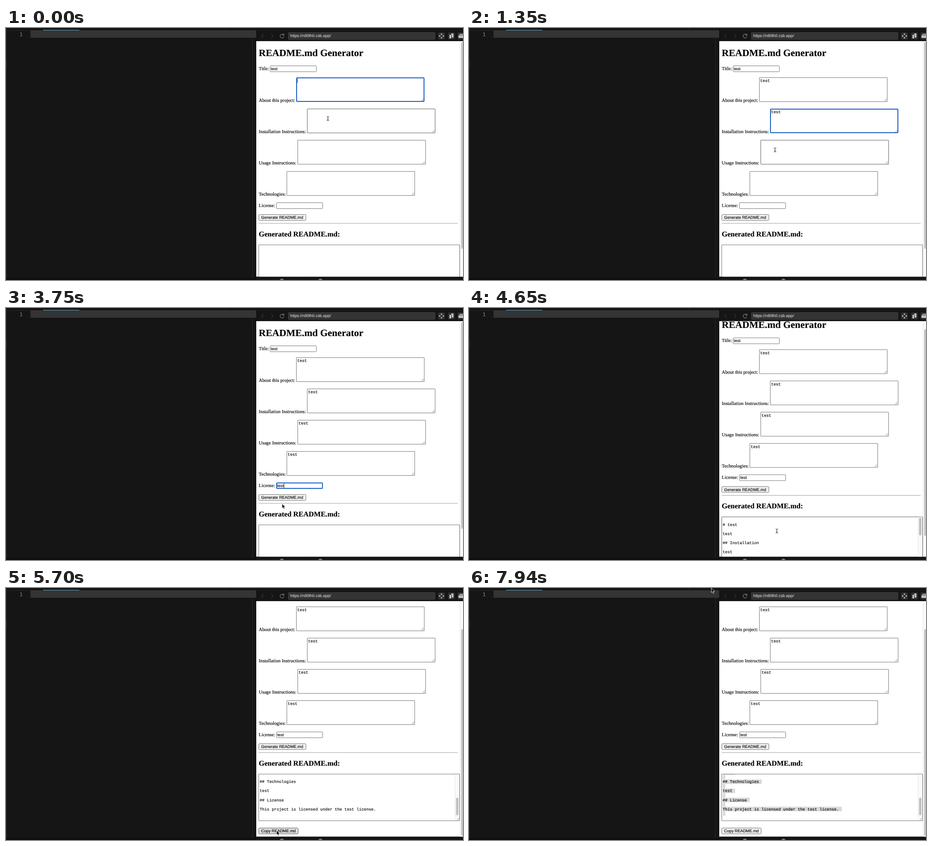
Write an HTML page that moves like this. It is 1008 by 556 pixels and loops after 8 s.

```html
<!DOCTYPE html>
<html lang="en">
<head>
<meta charset="utf-8">
<title>README.md Generator</title>
<style>
html, body { margin: 0; width: 100%; height: 100%; overflow: hidden; background: #151515; }
svg { display: block; width: 1008px; height: 556px; }
text { white-space: pre; text-rendering: geometricPrecision; }
#page text { stroke: #000; stroke-width: .15px; }
.serif { font: 10.7px "Liberation Serif", serif; }
.h1 { font: bold 21.4px "Liberation Serif", serif; }
.h2 { font: bold 16.05px "Liberation Serif", serif; }
.sans { font: 8.92px "Liberation Sans", sans-serif; }
.mono { font: 8.92px "Liberation Mono", monospace; }
.number { font: 11px "DejaVu Sans Mono", monospace; }
.line { fill: none; stroke-width: 1; }
</style>
</head>
<body>
<svg viewBox="0 0 1008 556">
  <defs>
    <clipPath id="view"><rect x="552" y="29" width="456" height="519.5"/></clipPath>
    <clipPath id="outBox"><rect x="558" y="479" width="432" height="102"/></clipPath>
    <path id="beam" d="M-2.500-4.500Q0-4.500 0-3Q0-4.500 2.500-4.500M0-3V3M-2.500 4.500Q0 4.500 0 3Q0 4.500 2.500 4.500M-1.200 1.500H1.200" class="line" stroke="#222"/>
    <path id="arrow" d="M0 0V10L2.300 7.900L4 11.800L5.700 11.100L4.100 7.300H7.200Z" stroke="#fff" stroke-width=".8"/>
    <path id="gem" d="M0-2l2 2-2 2-2-2z"/>
  </defs>

  <!-- editor -->
  <path d="M0 5.500H552M484.500 0V5M.500 0V556M543.500 21V552" class="line" stroke="#272727"/>
  <rect x="54" y="5" width="498" height="16.500" fill="#343434"/>
  <rect x="82" y="4" width="80" height="1.300" fill="#4f8fb5"/>
  <rect y="72" width="1" height="19" fill="#454545"/>
  <rect y="552" width="552" height="4" fill="#0d0d0d"/>
  <text x="30" y="17.500" class="number" fill="#8c8c8c">1</text>

  <!-- browser bar -->
  <path d="M552.500 0V29" class="line" stroke="#0c0c0c"/>
  <path d="M553 5.500H1008" class="line" stroke="#1d1d1d"/>
  <rect x="622" y="9" width="325" height="17" rx="2" fill="#343434"/>
  <text x="627" y="20.300" class="sans" fill="#f0f0f0">https://n80lh0.csb.app/</text>
  <path d="M568 13l-4.500 4.500 4.500 4.500M585 13l4.500 4.500-4.500 4.500" class="line" stroke="#484848"/>
  <path d="M612.500 15.500a4.300 4.300 0 1 0 .500 3.500M613 12.500v3.500h-3.500" class="line" stroke="#a8a8a8"/>
  <g fill="#303030">
    <rect x="953" y="10" width="15" height="15" rx="2"/>
    <rect x="975" y="10" width="15" height="15" rx="2"/>
    <rect x="996" y="10" width="15" height="15" rx="2"/>
  </g>
  <g fill="#bdbdbd">
    <use href="#gem" x="960.500" y="13.500"/><use href="#gem" x="960.500" y="21.500"/>
    <use href="#gem" x="956.500" y="17.500"/><use href="#gem" x="964.500" y="17.500"/>
    <path d="M978 15h4v8h-4zM982 12h5v9h-4v-6h-1zM1000 13h8v2h-8zM998 16h10v6h-10z"/>
  </g>

  <g clip-path="url(#view)">
    <rect x="552" y="29" width="456" height="520" fill="#fff"/>
    <g id="page"></g>
    <rect x="1002" y="29" width="6" height="520" fill="#fafafa"/>
    <path d="M1001.500 29V549" class="line" stroke="#e6e6e6"/>
    <rect id="thumb" x="1004" width="5" height="456" rx="2" fill="#c1c1c1"/>
  </g>

  <!-- lower tabs -->
  <g class="sans" fill="#777">
    <text x="566" y="561.500">Console</text><circle cx="608.500" cy="558" r="5"/>
    <text x="625" y="561.500">Problems</text><circle cx="693.500" cy="558" r="5"/>
  </g>
  <use id="mouse"/>
</svg>
<script>
const $ = id => document.getElementById(id);
const LOOP = 8000, STEP = 150;
const LEFT = 557, CHAR = 5.352, ROW = 10.03, TEXT_Y = 10.4;
const SUBMIT = 4050, COPY = 6150, SELECT = 7500;
const PAGE_END = 68, OUT_END = 12 * ROW;

const pen = document.createElement('canvas').getContext('2d');
pen.font = '10.7px "Liberation Serif", serif';

// Each box follows its label; areas are stacked at an even pitch between two inputs.
const focusAt = [-LOOP, 0, 450, 1500, 2100, 3150, SUBMIT];
const fields = ['Title', 'About this project', 'Installation Instructions',
  'Usage Instructions', 'Technologies', 'License'].map((name, i) => {
  const label = name + ':', input = i % 5 === 0;
  const x = Math.floor(LEFT + 3.2 + pen.measureText(label).width);
  return input
    ? { label, input, x, y: i ? 385 : 83, w: 103, h: 14, base: 10, from: focusAt[i], to: focusAt[i + 1] }
    : { label, x, y: 40 + 69 * i, w: 283, h: 54, base: 54, from: focusAt[i], to: focusAt[i + 1] };
});
const output = { x: LEFT, y: 478, w: 444, h: 104 };
const generate = { x: LEFT, y: 411, w: 105, h: 14, label: 'Generate README.md', press: SUBMIT };
const copy = { x: LEFT, y: 597, w: 88, h: 14, label: 'Copy README.md', press: COPY };
const lines = ['# test', 'test', '## Installation', 'test', '## Usage', 'test', '## Technologies',
  'test', '## License', 'This project is licensed under the test license.'].flatMap(s => ['', s]).concat('');

// pointer moves: start, end, x, y
const moves = [
  [750, 1050, 680, 328], [1050, 1350, 675, 269], [1800, 2100, 668, 336],
  [2400, 2850, 641, 391], [3450, 3750, 609, 432], [3750, 3900, 608, 420],
  [4200, 4500, 679, 492], [5250, 5700, 597, 535], [6450, 7200, 534.5, 0]
];

function ease(t, from, to) {
  const p = Math.min(1, Math.max(0, (t - from) / (to - from)));
  return p * p * (3 - 2 * p);
}

function pointerAt(t) {
  let x = 710, y = 200;
  for (const [from, to, x1, y1] of moves) {
    const p = ease(t, from, to);
    x += (x1 - x) * p;
    y += (y1 - y) * p;
  }
  return [x, y];
}

const inside = (b, x, y) => x >= b.x && x < b.x + b.w && y >= b.y && y < b.y + b.h;
const text = (x, y, cls, s) => `<text x="${x}" y="${y}" class="${cls}">${s}</text>`;
const rect = (x, y, w, h, fill, more = '') =>
  `<rect x="${x}" y="${y}" width="${w}" height="${h}" fill="${fill}" ${more}/>`;
const line = (d, color) => `<path d="${d}" class="line" stroke="${color}"/>`;
const frame = (b, fill, hover, r) =>
  rect(b.x + .5, b.y + .5, b.w - 1, b.h - 1, fill, `stroke="${hover ? '#5f5f5f' : '#767676'}" rx="${r}"`);

function box(b, hover, focus) {
  const grip = b.input ? '' : line(`M${b.x + b.w - 7} ${b.y + b.h - 2}l5-5m-2 5l2-2`, '#888');
  return (focus
    ? rect(b.x + 1, b.y + 1, b.w - 2, b.h - 2, '#fff', 'stroke="#1a5ec4" stroke-width="2" rx="1"')
    : frame(b, '#fff', hover, b.input ? 1 : .5)) + grip;
}

function field(f, t, hover) {
  const focus = t >= f.from && t < f.to, age = t - f.from;
  const typed = 'test'.slice(0, Math.max(0, age / STEP * 2));
  const x = f.x + 2.3, end = x + typed.length * (f.input ? 3.6 : CHAR);
  const caret = focus && age % 1200 <= 600 ? rect(end + .2, f.y + 2.5, .8, 9.5, '#000') : '';
  return text(LEFT + .5, f.y + f.base, 'serif', f.label) + box(f, hover, focus)
    + text(x, f.y + TEXT_Y - (f.input ? .4 : 0), f.input ? 'sans' : 'mono', typed) + caret;
}

function button(b, t, hover) {
  const down = t >= b.press && t < b.press + STEP;
  return frame(b, down ? '#f5f5f5' : hover ? '#dedede' : '#efefef', hover, 2)
    + text(b.x + 5.8, b.y + TEXT_Y, 'sans', b.label);
}

function result(t, hover) {
  if (t <= SUBMIT) return box(output, hover);
  const p = ease(t, 4950, 5400);
  const rows = lines.map((s, i) => {
    const y = output.y + TEXT_Y + i * ROW - p * OUT_END;
    const mark = t >= SELECT ? rect(560, y - 8, (s.length + 1) * CHAR, ROW, '#d9d9d9') : '';
    return mark + text(559.5, y, 'mono', s);
  }).join('');
  return box(output, hover) + `<g clip-path="url(#outBox)">${rows}</g>`
    + rect(990, 479, 10, 92, '#fafafa') + line('M990.5 479V581M990 571.5H1000', '#e6e6e6')
    + rect(992.5, 480.5 + p * 50, 5.5, 39, '#c1c1c1', 'rx="2.7"');
}

function draw(t) {
  const [x, y] = pointerAt(t), scroll = PAGE_END * ease(t, 4500, 4950);
  const over = b => inside(b, x, y + scroll);
  const copying = t >= COPY && t < SELECT;
  $('page').setAttribute('transform', `translate(0 ${-scroll})`);
  $('page').innerHTML = text(LEFT + .5, 62, 'h1', 'README.md Generator')
    + fields.map(f => field(f, t, over(f))).join('')
    + button(generate, t, over(generate))
    + line('M557.5 431H996', '#9a9a9a')
    + text(LEFT + .5, 460, 'h2', 'Generated README.md:')
    + result(t, over(output))
    + button(copy, t, over(copy) || copying);
  $('thumb').setAttribute('y', 31 + scroll * 60 / PAGE_END);
  $('mouse').setAttribute('href', over(output) || fields.some(over) ? '#beam' : '#arrow');
  $('mouse').setAttribute('transform', `translate(${x} ${y})`);
}

let last = -1;
function tick() {
  const t = Math.floor(performance.now() % LOOP / STEP) * STEP;
  if (t !== last) draw(last = t);
  requestAnimationFrame(tick);
}
tick();
</script>
</body>
</html>
```
